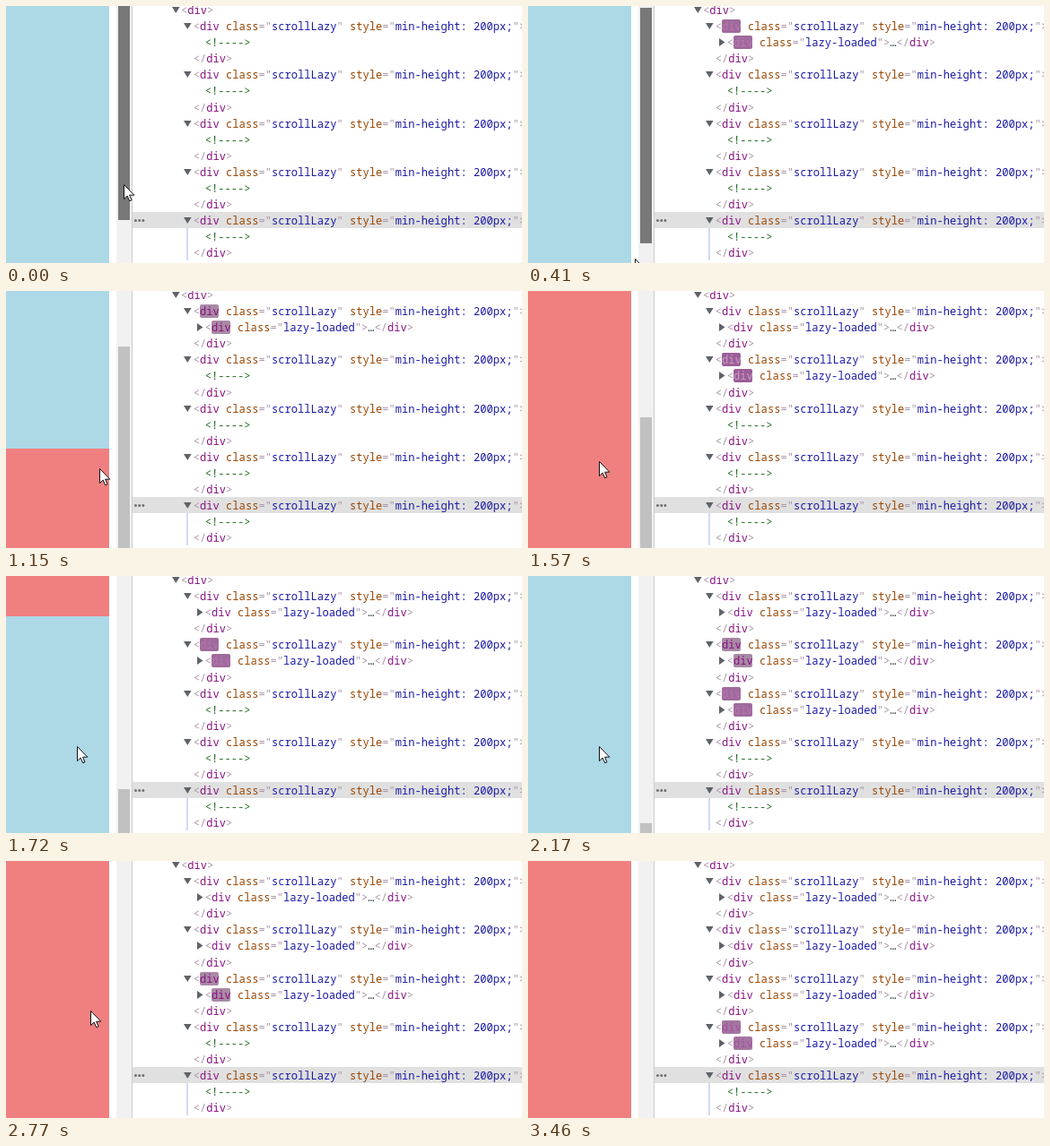
Recreate the animation shown at these times as an HTML page. Size 575x287 px, loop 3560 ms.

```html
<!DOCTYPE html>
<html lang="en">
<head>
<meta charset="utf-8">
<title>Lazy loading on scroll</title>
<style>
  html, body { margin: 0; width: 100%; height: 100%; overflow: hidden; background: #fff; }
  svg { display: block; width: 575px; height: 287px; }
  text { font: 12.1px "Noto Sans Mono", "DejaVu Sans Mono", monospace; white-space: pre; fill: #a894a6; }
  .tag { fill: #881280; }
  .attr { fill: #994500; }
  .val { fill: #1a1aa6; }
  .note { fill: #236e25; }
  .dots { fill: #303942; }
  .arrow { fill: #5f6368; }
</style>
</head>
<body>
<svg viewBox="0 0 575 287">
  <rect id="above" width="115" height="287"/>
  <rect id="below" width="115" height="287"/>
  <rect x="123" width="17" height="287" fill="#f1f1f1"/>
  <rect id="thumb" x="125" width="13" height="263"/>
  <rect x="140" width="1" height="287" fill="#ccc"/>
  <rect x="141" y="230" width="434" height="18" fill="#e0e0e0"/>
  <path d="M144.5 239.5h8.5" stroke="#6e6e6e" stroke-width="3" stroke-linecap="round" stroke-dasharray="0 4.2"/>
  <rect x="201" y="248" width="2" height="36" fill="#cfdcf6"/>
  <g id="tree"></g>
  <path id="cursor" d="M.5 .5V16.6L4.2 13.1L6.7 18.8L9 17.8L6.6 12.2H11.8Z" fill="#fff" stroke="#111"/>
</svg>
<script>
const LOOP = 3560, COLORS = ['#add8e6', '#f08080'];
const $ = id => document.getElementById(id);

// The picture refreshes in even steps within each phase: [phase end, steps]
const phases = [[410, 3], [1150, 6], [1420, 2], [2770, 9], [3010, 2], [3460, 3]];

// Motion is linear between these points: [time, ...values]
const scroll = [[0, -24], [410, 2], [903, 22], [1150, 62], [1420, 125], [1570, 141],
  [1720, 238], [1870, 160], [2020, 218], [2170, 276], [2470, 276], [2770, 380]];
const pointer = [[0, 131, 199], [274, 119, 262], [533, 119, 300], [903, 119, 300], [1150, 104, 198],
  [1420, 79, 190], [2170, 79, 190], [2320, 101, 185], [2770, 94, 167], [3160, 470, 264], [3310, 540, 300]];

const loadTimes = [120, 1420, 1870, 3010, Infinity];
const joins = [125, 254, 380];  // thumb position at which the next section fills the view
const PAGE_RATIO = 2.8;         // page pixels per thumb pixel
const RELEASE = 1020, FADE = 1040, GONE = 1200;

const lerp = (a, b, p) => a.map((v, i) => v + (b[i] - v) * p);

function at(keys, t) {
  const i = keys.findIndex(k => k[0] > t);
  if (i < 0) return keys[keys.length - 1].slice(1);
  const [a, b] = [keys[i - 1], keys[i]];
  return lerp(a, b, (t - a[0]) / (b[0] - a[0])).slice(1);
}

function snap(t) {
  let from = 0;
  for (const [end, steps] of phases) {
    const step = (end - from) / steps;
    if (t < end) return Math.round(from + Math.floor((t - from) / step) * step);
    from = end;
  }
  return from;
}

const span = (cls, s) => `<tspan class="${cls}">${s}</tspan>`;
const attr = (name, value) => ` ${span('attr', name)}="${span('val', value)}"`;
const open = (attrs = '') => `&lt;${span('tag', 'div')}${attrs}&gt;`;
const close = `&lt;/${span('tag', 'div')}&gt;`;
const rowY = i => Math.round(5.1 + 18.07 * i);
const line = (x, row, body) => `<text x="${x}" y="${rowY(row) + 4}">${body}</text>`;
const down = (x, row) => `<path class="arrow" d="M${x} ${rowY(row) - 4}h8.6l-4.3 7z"/>`;
const right = (x, row) => `<path class="arrow" d="M${x} ${rowY(row) - 5}v9l6.5 -4.5z"/>`;
const glow = (x, row) => `<rect class="glow" x="${x}" y="${rowY(row) - 8}" width="21" height="15" rx="2"/>`;

function item(n) {
  const r = 1 + n * 3;
  return `<g class="item">${glow(216, r)}${glow(229, r + 1)}${down(198, r)}
    ${line(208.8, r, open(attr('class', 'scrollLazy') + attr('style', 'min-height: 200px;')))}
    <g class="empty">${line(221.8, r + 1, span('note', '&lt;!----&gt;'))}</g>
    <g class="full">${right(213, r + 1)}
      ${line(221.8, r + 1, open(attr('class', 'lazy-loaded')) + span('dots', '…') + close)}</g>
    ${line(208.8, r + 2, close)}</g>`;
}

$('tree').innerHTML = down(185, 0) + line(195, 0, open()) + loadTimes.map((_, n) => item(n)).join('');

const items = [...document.querySelectorAll('.item')].map(el => ({
  empty: el.querySelector('.empty'),
  full: el.querySelector('.full'),
  glows: el.querySelectorAll('.glow'),
  tags: [el.querySelector('.tag'), el.querySelector('.full .tag')]
}));

function drawItem(it, age) {
  const loaded = age >= 0, lit = loaded && age < GONE;
  const p = lit ? Math.min(1, age / 750) ** 0.7 : 1;
  const back = lerp([148, 74, 144], [169, 137, 165], p);
  const ink = lerp([236, 220, 235], [136, 18, 128], p);
  it.empty.style.display = loaded ? 'none' : '';
  it.full.style.display = loaded ? '' : 'none';
  it.glows.forEach(g => {
    g.style.fill = `rgb(${back})`;
    g.style.opacity = !lit ? 0 : age > FADE ? 0.5 : 1;
  });
  it.tags.forEach(tag => { tag.style.fill = `rgb(${ink})`; });
}

function draw(t) {
  const [top] = at(scroll, t);
  const section = Math.max(0, loadTimes.filter(k => k <= t).length - 1);
  const edge = ((joins[section] ?? Infinity) - top) * PAGE_RATIO;
  $('above').setAttribute('fill', COLORS[section % 2]);
  $('below').setAttribute('fill', COLORS[(section + 1) % 2]);
  $('below').setAttribute('y', Math.round(Math.min(287, edge)));
  $('thumb').setAttribute('y', Math.round(top));
  $('thumb').setAttribute('fill', t < RELEASE ? '#787878' : '#c1c1c1');
  $('cursor').setAttribute('transform', `translate(${at(pointer, t).map(Math.round)})`);
  items.forEach((it, n) => drawItem(it, t - loadTimes[n]));
}

let start, shown;
function frame(now) {
  start ??= now;
  const tick = snap((now - start) % LOOP);
  if (tick !== shown) draw(shown = tick);
  requestAnimationFrame(frame);
}
draw(0);
requestAnimationFrame(frame);
</script>
</body>
</html>
```
